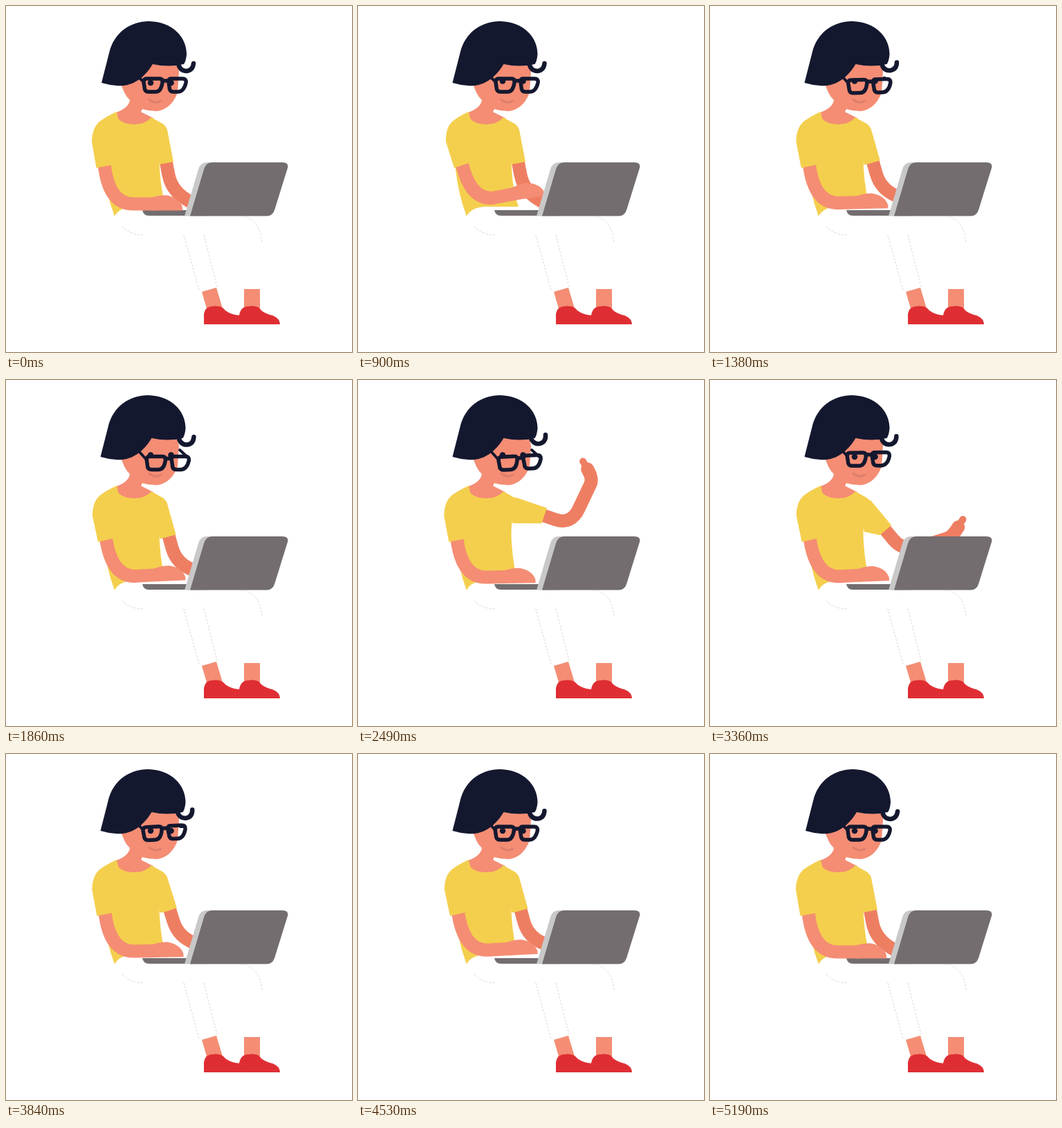
Animation of 500 by 500 pixels, one loop 5.22 s. Source, as an HTML page:

```html
<!DOCTYPE html>
<html lang="en">
<head>
<meta charset="utf-8">
<title>Typing at a laptop</title>
<style>
  html, body { margin: 0; width: 100%; height: 100%; overflow: hidden; background: #fff; }
  svg { display: block; width: 100vw; height: 100vh; }
  .skin { fill: #f48d74; }
  .shirt { fill: #f4cf4d; }
  .ink { fill: #14182f; }
  .shoe { fill: #df2e33; }
  .line { fill: none; stroke-linejoin: round; stroke-linecap: round; }
  .frame { stroke: #14182f; stroke-width: 5.5; }
  .far { stroke: #ee7e62; stroke-width: 19; }
  .crease { stroke: #ccc; stroke-width: .8; stroke-dasharray: 2 3; }
</style>
</head>
<body>
<svg viewBox="0 0 500 500">
  <!-- face and neck -->
  <path class="skin" d="M165 108Q170 128 179 136Q177 148 158 154Q160 173 185 174Q205 172 213 162L195 153L197 149Q207 152 218 152Q239 149 248 125L250 95L245 75H190Z"/>
  <path class="line" d="M207 135Q215 142 224 137" stroke="#dd7f6a" stroke-width="3"/>

  <!-- far arm -->
  <path id="farArm" class="line far"/>
  <path id="farTip" class="line far" style="stroke-width:10"/>

  <g id="eyes" class="ink"><circle cx="209" cy="111" r="4.3"/><circle cx="238.5" cy="111" r="4.3"/></g>
  <path id="temples" class="line frame" style="stroke-width:4"/>
  <g id="glasses" class="line frame">
    <path d="M203 105H222Q227 105 226 111Q224 124 216 124H206Q200 124 200 117L199 110Q199 105 203 105Z"/>
    <path d="M238 105H255Q261 105 260 111Q257 124 248 124H242Q236 124 236 117L235 110Q235 105 238 105Z"/>
    <path d="M226 108H235"/>
  </g>

  <!-- hair -->
  <g id="hair">
    <path class="ink" d="M138 111L149 68C156 38 180 22 207 22C240 23 261 44 261 70Q260 80 257 84Q235 89 212 84C198 107 180 117 160 115Q148 114 138 111Z"/>
    <path id="curl" class="line" d="M249 83Q251 94 261 94Q270 93 271 83" stroke="#14182f" stroke-width="6.5"/>
  </g>

  <!-- shirt -->
  <path id="farSleeve" class="shirt"/>
  <circle class="shirt" cx="222" cy="181" r="11"/>
  <path class="shirt" d="M160 153Q146 159 137 168L137 220L141 236Q145 272 157 304Q163 291 185 290L232 291L226 270Q223 252 222 235Q220 208 226 190L228 171L210 161Q202 171 184 171Q162 170 158 155Z"/>

  <!-- trousers, ankles, shoes -->
  <path fill="#fff" d="M157 304Q163 291 185 290H232L240 292H330Q365 303 370 342L368 408H344L335 345L286 331L305 406L279 412L257 331H195Q165 329 157 304Z"/>
  <path class="line crease" d="M168 319Q180 331 200 331M257 331L279 411M286 331L305 405M340 303Q367 308 370 342"/>
  <path class="skin" d="M283 413L304 407L313 437H290ZM344 409H367V437H344Z"/>
  <path class="shoe" d="M286 460V445Q288 434 298 434Q311 432 317 440Q325 446 337 447L342 460Z"/>
  <path class="shoe" d="M337 460V447Q339 434 351 434Q364 432 369 440Q375 445 386 447.500Q396 452 396 460Z"/>

  <!-- laptop base, near arm, laptop lid -->
  <path fill="#736d70" d="M197 295H264V303H206Q199 303 197 295Z"/>
  <path id="nearArm" class="line" stroke="#f48d74" stroke-width="19"/>
  <path id="nearHand" class="skin" d="M-3-9.5Q8-13 18-12.5Q37-9 41 5V9.5H-3Z"/>
  <path id="nearSleeve" class="shirt"/>
  <path fill="#c9c8c9" d="M258 303.5L278 236Q281 226 290 226H310L290 303.5Z"/>
  <path fill="#736d70" d="M266 303.5L286 236Q289 226 298 226H399Q409 226 407 234L388 295Q385 303.5 377 303.5H266Z"/>
</svg>
<script>
const LOOP = 5220, STEP = 30, TYPING = 1380;

const el = {};
document.querySelectorAll("[id]").forEach(n => el[n.id] = n);
const set = (id, d) => el[id].setAttribute("d", d);
const move = (id, value) => el[id].setAttribute("transform", value);
const mix = (a, b, p) => a.map((v, i) => v + (b[i] - v) * p);

// smooth 0 to 1 between two times
function ramp(t, from, to) {
  const u = Math.min(1, Math.max(0, (t - from) / (to - from)));
  return u * u * (3 - 2 * u);
}
const pulse = (t, a, b, c, d) => ramp(t, a, b) - ramp(t, c, d);

function polar([x, y], deg, len) {
  const a = deg * Math.PI / 180;
  return [x + Math.cos(a) * len, y + Math.sin(a) * len];
}

function pose(t) {
  const lean = pulse(t, 1000, 1500, 4550, 5190);
  return {
    lean,
    wave: lean * Math.cos(2 * Math.PI * (t - 4530) / TYPING),
    flick: pulse(t, 0, 270, 270, 540),
    tap: pulse(t, 540, 900, 900, 1260),
    raise: pulse(t, 2250, 2660, 3060, 3520),
    slide: pulse(t, 1200, 1700, 2680, 2880),
    lookUp: pulse(t, 540, 900, 2680, 2880),
    sway: pulse(t, 0, 900, 4530, 5190)
  };
}

function drawFarArm({ lean, wave, flick, raise }) {
  const up = 79 - 5.5 * lean + wave - 3 * flick - 85.5 * raise;
  const fore = 30 - 10 * lean - 135 * raise;
  const palm = -10 - 176 * raise;
  const shoulder = [222.5 + 2 * raise, 180 + raise];
  const elbow = polar(shoulder, up, 89);
  const wrist = polar(elbow, fore, 74);
  set("farArm", `M${shoulder}L${polar(elbow, up, -24)}Q${elbow} ${polar(elbow, fore, 26)}` +
    `L${polar(wrist, fore, -9)}Q${wrist} ${polar(wrist, palm, 16)}`);
  set("farTip", `M${polar(wrist, palm, 8)}L${polar(wrist, palm, 29)}`);

  const hem = polar(shoulder, up, 48), half = 10.5 + 2 * raise;
  const armpit = mix([222, 229], [225, 194], raise);
  set("farSleeve", `M${polar(shoulder, up - 90, half)}L${polar(hem, up - 90, half)}` +
    `L${polar(hem, up + 90, half)}L${armpit}L215 190Z`);
}

function drawNearArm({ lean, wave, tap }) {
  const p = tap + 0.2 * lean + 0.1 * wave;
  const wrist = mix([214, 286], [228, 271], p);
  set("nearArm", `M${mix([142, 228], [150, 227], p)}Q${mix([148, 286], [163, 282], p)} ` +
    `${mix([184, 286], [197, 277], p)}L${wrist}`);
  move("nearHand", `translate(${wrist}) rotate(${-9 * p})`);
  set("nearSleeve", `M160 153Q146 159 ${mix([135, 167], [136, 167], p)}Q${mix([124, 177], [126, 177], p)} ` +
    `${mix([124, 196], [127, 196], p)}L${mix([130.5, 234], [139, 234], p)}L${mix([152, 230], [160, 227], p)}L165 175Z`);
}

function drawHead({ lean, wave, flick, raise, slide, lookUp, sway }) {
  const dx = 5 * slide - lean * 0.7, dy = 5.5 * slide;
  const tilt = 1.5 * (wave - lean);
  move("glasses", `translate(${dx} ${dy}) rotate(${tilt} 215 115)`);
  set("temples", `M192 103L${199 + dx} ${110 + dy}M${252 - slide} ${105 - 4 * slide}L${257 + dx} ${105 + dy}`);
  move("eyes", `translate(0 ${-2.5 * lookUp})`);
  move("hair", `translate(${-1.5 * sway} 0)`);
  const swing = 2.5 * wave - 4.5 * lean - 5 * raise - 4 * flick;
  move("curl", `translate(${2 * slide} 0) rotate(${swing} 250 84)`);
}

const start = performance.now();
function draw(now) {
  const t = Math.floor(Math.max(0, now - start) % LOOP / STEP) * STEP;
  const p = pose(t);
  drawFarArm(p);
  drawNearArm(p);
  drawHead(p);
  requestAnimationFrame(draw);
}
draw(start);
</script>
</body>
</html>
```
